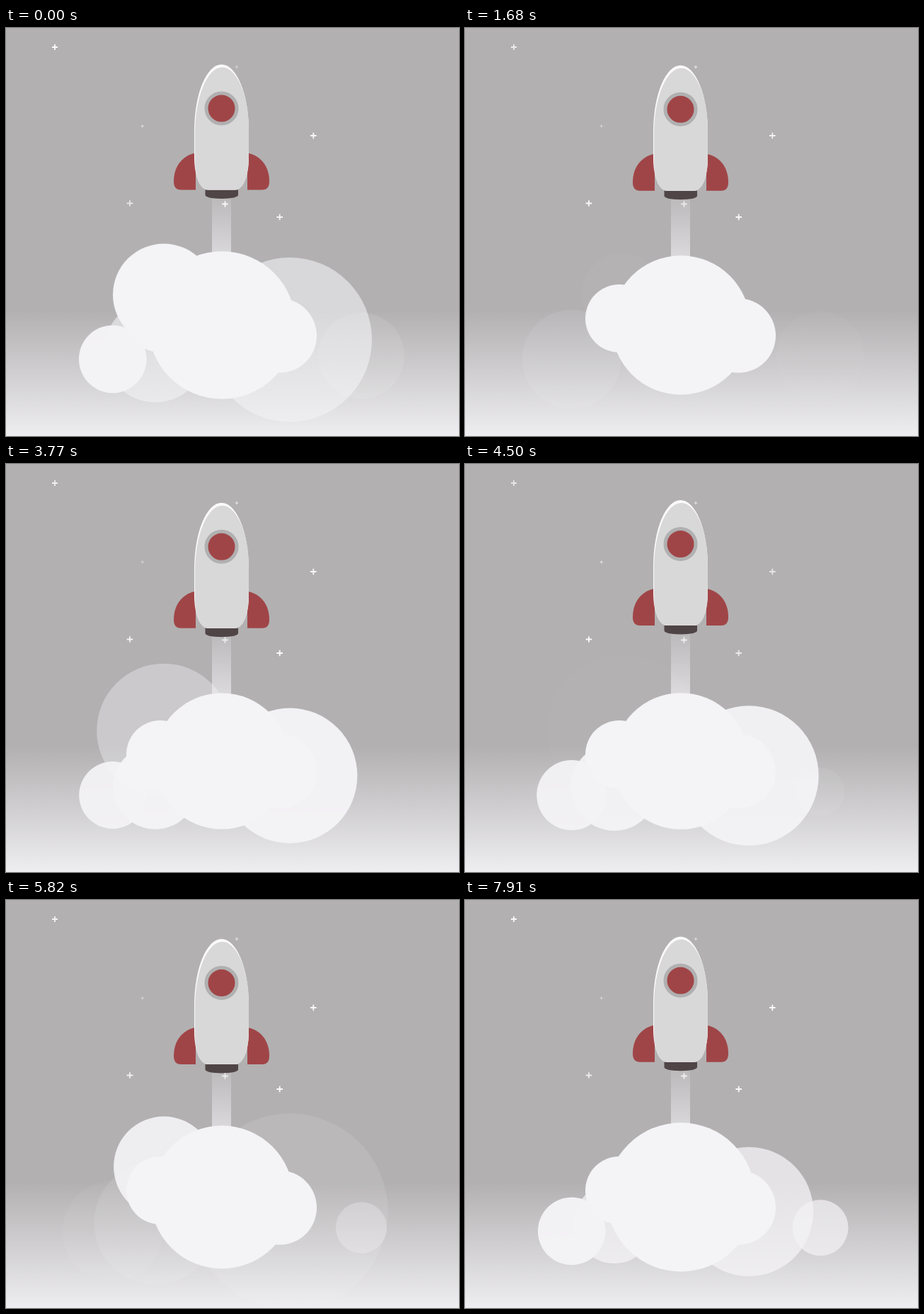
An HTML page for the animation above (7960 ms loop, 640 by 576 pixels).

```html
<!DOCTYPE html>
<html lang="en">
<head>
<meta charset="utf-8">
<title>Rocket launch</title>
<style>
  html, body { margin: 0; height: 100%; overflow: hidden; background: #b2b0b1; }
  svg { display: block; width: 640px; height: 576px; }
</style>
</head>
<body>
<svg viewBox="0 0 640 576">
  <defs>
    <linearGradient id="haze" x2="0" y2="1">
      <stop stop-color="#eeedef" stop-opacity="0"/>
      <stop offset="1" stop-color="#eeedef"/>
    </linearGradient>
    <linearGradient id="jet" x2="0" y2="1">
      <stop stop-color="#f4f3f6" stop-opacity=".1"/>
      <stop offset="1" stop-color="#f4f3f6" stop-opacity=".65"/>
    </linearGradient>
    <path id="hull" d="M266 146C266 92 284 52 304.5 52S343 92 343 146V182C343 208 336 229 323 229H286C273 229 266 208 266 182Z"/>
    <path id="fin" d="M237 217C237 195 250 180 268 177V229H247Q237 229 237 217Z"/>
    <clipPath id="inside"><use href="#hull"/></clipPath>
  </defs>
  <rect width="640" height="576" fill="#b2b0b1"/>
  <rect y="398" width="640" height="178" fill="url(#haze)"/>
  <rect x="291" y="232" width="27" height="98" fill="url(#jet)"/>
  <g id="rocket">
    <g fill="#a04547">
      <use href="#fin"/>
      <use href="#fin" transform="matrix(-1 0 0 1 609 0)"/>
    </g>
    <path fill="#504546" d="M281.5 229H328V236Q328 241 304.5 241.5Q281.5 241 281.5 236Z"/>
    <use href="#hull" fill="#fbfafb"/>
    <g clip-path="url(#inside)"><use href="#hull" x="1" y="4" fill="#d9d8d9"/></g>
    <circle cx="304.5" cy="114" r="21.5" fill="#a04547" stroke="#b1b0b1" stroke-width="5"/>
  </g>
  <g id="smoke" fill="#f4f3f6"></g>
  <g id="stars" stroke="#fff"></g>
</svg>
<script>
const LOOP = 7960;
const $ = id => document.getElementById(id);

function add(parent, tag, attrs) {
  const el = document.createElementNS('http://www.w3.org/2000/svg', tag);
  for (const k in attrs) el.setAttribute(k, attrs[k]);
  return parent.appendChild(el);
}

// cubic-bezier(.25, .1, .25, 1)
function ease(x) {
  const curve = (s, a, b) => 3 * s * (1 - s) * ((1 - s) * a + s * b) + s ** 3;
  let lo = 0, hi = 1;
  for (let i = 0; i < 20; i++) {
    const mid = (lo + hi) / 2;
    if (curve(mid, .25, .25) < x) lo = mid; else hi = mid;
  }
  return curve(lo, .1, 1);
}

// Two eased halves per period; start counts in halves.
function cycle(t, period, start) {
  const x = (start + 2 * t / period) % 2;
  return { rising: x < 1, u: ease(x % 1) };
}

// x, y, radius, period, start
const puffs = [
  [401, 440, 96, 4950, 1.253],
  [502, 462.7, 42, 19800, 1.616],
  [211, 456, 60, 4950, 1.253],
  [150.7, 467.5, 48, 3960, .8],
  [223, 376.5, 72, 3160, .98]
].map(([cx, cy, r, period, start]) =>
  ({ r, period, start, el: add($('smoke'), 'circle', { cx, cy }) }));

add($('smoke'), 'circle', { cx: 218, cy: 410, r: 48 });
add($('smoke'), 'circle', { cx: 386.5, cy: 434.3, r: 52.5 });
const core = add($('smoke'), 'circle', { cx: 305, cy: 419.5 });

// x, y, arm length
const stars = [
  [69, 27, 4], [326, 55, 2.2], [192.7, 138.5, 2.2], [434.3, 152, 4.3],
  [175, 247.5, 4.3], [309.5, 248.5, 4.3], [386.7, 267, 4.3]
].map(([x, y, a]) => add($('stars'), 'path', {
  d: `M${x - a} ${y}h${2 * a}M${x} ${y - a}v${2 * a}`,
  'stroke-width': a > 3 ? 1.8 : 1.1
}));

function draw(t) {
  for (const { el, r, period, start } of puffs) {
    const { rising, u } = cycle(t, period, start);
    el.setAttribute('r', r * (rising ? .8 + .2 * u : 1 + .5 * u));
    el.setAttribute('opacity', rising ? u : 1 - u);
  }

  const pulse = cycle(t, 9900, .13);
  core.setAttribute('r', 96 * (1 + .1 * (pulse.rising ? 1 - pulse.u : pulse.u)));

  const bob = cycle(t, 495, .5);
  const lift = bob.rising ? bob.u : 1 - bob.u;
  $('rocket').setAttribute('transform', `translate(0 ${3 - 4.3 * lift})`);

  stars.forEach((el, i) => {
    const base = i === 1 || i === 2 ? .6 : .82;
    el.setAttribute('opacity', base + .14 * Math.cos(t / 160 + i * 2.3));
  });
}

const begin = performance.now();
function tick() {
  draw((performance.now() - begin) % LOOP);
  requestAnimationFrame(tick);
}
tick();
</script>
</body>
</html>
```
